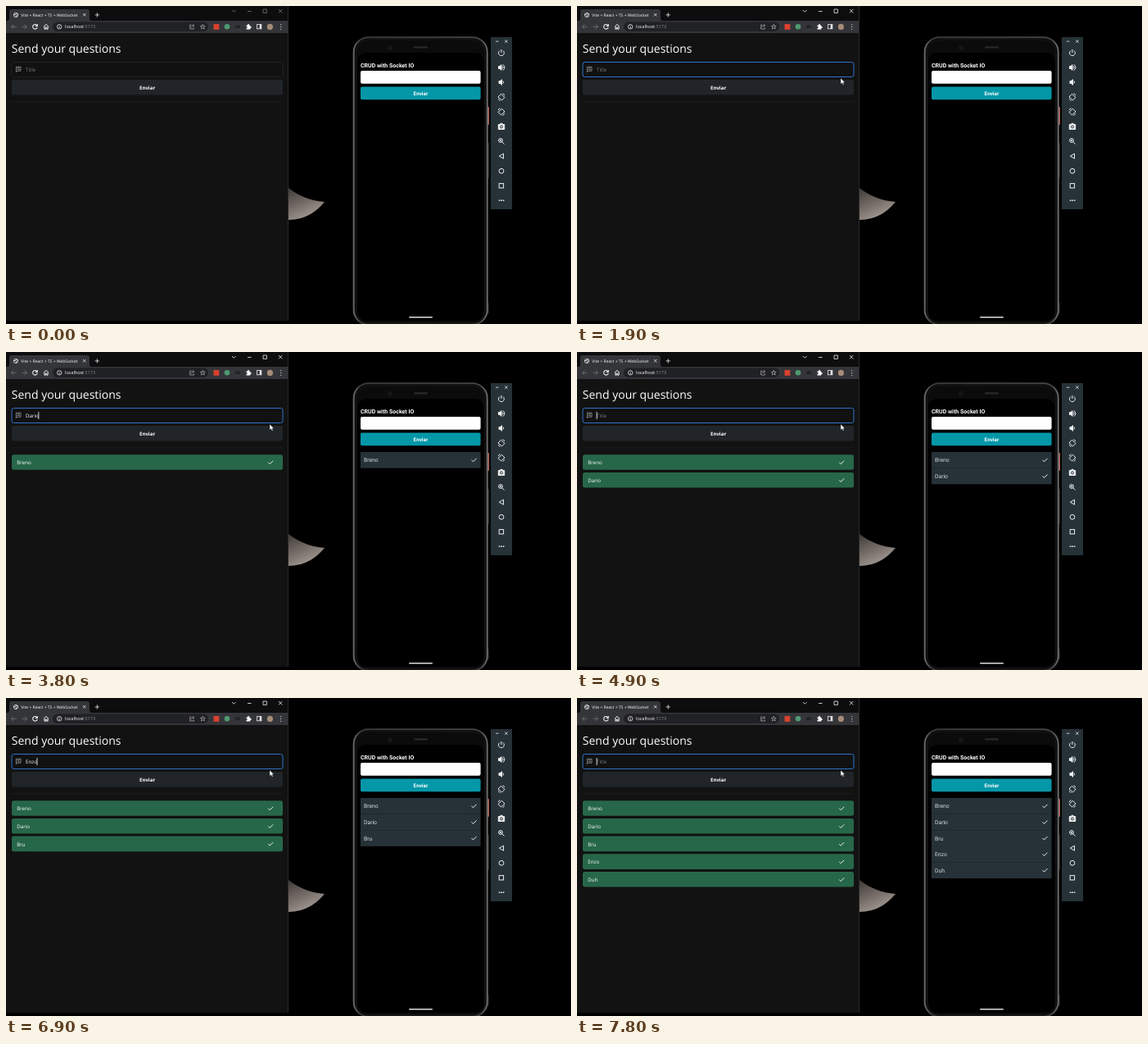
Animation, 690 px wide and 388 px high, one loop 8000 ms. Source, as an HTML page:

```html
<!DOCTYPE html>
<html lang="en">
<head>
<meta charset="utf-8">
<title>Send your questions</title>
<style>
  html, body { margin: 0; width: 100%; height: 100%; overflow: hidden; background: #000; }
  svg { display: block; width: 690px; height: 388px; }
  text { fill: #fff; font-family: "Open Sans", sans-serif; text-rendering: geometricPrecision; white-space: pre; }
  .app text { font-family: Roboto, sans-serif; }
  .line { fill: none; stroke: #eee; stroke-width: 1; }
  .bold { font-weight: 700; }
</style>
</head>
<body>
<svg viewBox="0 0 690 388">
  <defs>
    <linearGradient id="moon" x1="0" y1="0" x2=".5" y2="1">
      <stop offset="0" stop-color="#3e3936"/>
      <stop offset=".55" stop-color="#766d68"/>
      <stop offset="1" stop-color="#a39a94"/>
    </linearGradient>
    <linearGradient id="metal">
      <stop offset="0" stop-color="#666"/>
      <stop offset=".05" stop-color="#3a3a3a"/>
      <stop offset=".95" stop-color="#444"/>
      <stop offset="1" stop-color="#6a6a6a"/>
    </linearGradient>
  </defs>

  <rect width="690" height="388"/>
  <path d="M345 222Q364 237 389 239Q371 261 345 261Z" fill="url(#moon)"/>

  <!-- Browser -->
  <rect width="345" height="384" fill="#121212"/>
  <rect width="345" height="18" fill="#0d0d0e"/>
  <path d="M0 18H2Q4 18 4 15V7Q4 4 7 4H99Q102 4 102 7V15Q102 18 105 18H345V33H0Z" fill="#343539"/>
  <rect x="57" y="19.5" width="190" height="11.5" rx="5.7" fill="#202124"/>
  <path d="M344.5 0V384" class="line" style="stroke:#2a2a2a"/>
  <g class="line" style="stroke-width:.8">
    <circle cx="12" cy="11" r="2.6"/>
    <path d="M9.6 10.5H12L13 12L12 13.4M12 8.5L13 9.8H14.5"/>
    <path d="M94 9L97.4 12.4M97.4 9L94 12.4M108.7 10.9H113.9M111.3 8.3V13.5"/>
    <path d="M12.5 25.3H6.5M9.3 22.5L6.5 25.3L9.3 28.1M19.5 25.3H25.5M22.7 22.5L25.5 25.3L22.7 28.1" stroke="#77787b"/>
    <path d="M37.6 23.5A2.8 2.8 0 1 0 38.2 26M38.3 22V24.4H35.9" stroke-width="1.1"/>
    <path d="M46 25.3L49 22.4L52 25.3M46.9 25V28.2H48.3V26.2H49.7V28.2H51.1V25" stroke-width="1"/>
    <circle cx="65.2" cy="25.3" r="2.7"/>
    <path d="M65.2 25V27M65.2 23.6V24.2"/>
    <path d="M226.5 23H224.7V28H229.5V26.5M226 26Q226.5 24 229 23.8M228 22.2L229.8 23.8L228 25.4" stroke="#bbb" stroke-width=".7"/>
    <path d="M240.3 22.3L241.1 24.4H243.2L241.5 25.8L242.2 28L240.3 26.7L238.4 28L239.1 25.8L237.4 24.4H239.5Z" stroke="#ccc" stroke-width=".6"/>
    <rect x="306.5" y="22.6" width="5.4" height="5.2"/>
    <path d="M310.7 22.6V27.8" stroke-width="2"/>
  </g>
  <rect x="253.5" y="22" width="6.8" height="6.8" fill="#d8412f"/>
  <circle cx="270" cy="25.3" r="3.3" fill="#4f9a72"/>
  <rect x="280" y="23.5" width="6" height="3.5" fill="#222326"/>
  <path d="M293.5 23.5H295Q295 21.8 296 21.8T297 23.5H298.3V25Q299.8 25 299.8 26T298.3 27V28.5H293.5V27Q294.8 26.8 294.8 26T293.5 25Z" fill="#fff"/>
  <circle cx="322.4" cy="25.4" r="3.6" fill="#a58c77"/>
  <path d="M335.7 22.2V29" class="line" stroke-dasharray="1 1.8"/>
  <text x="18.3" y="12.8" font-size="5">Vite + React + TS + WebSocket</text>
  <text x="72" y="27.3" font-size="5.5">localhost<tspan fill="#8d9094">:5173</tspan></text>
  <path id="controls" class="line" d="M276 5L278.3 7.3L280.6 5M295 6.5H299.6M314 4H318.4V8.4H314ZM333 4L337.4 8.4M337.4 4L333 8.4" style="stroke-width:.8"/>

  <text x="6.8" y="56.5" font-size="14">Send your questions</text>
  <rect id="field" x="7" y="68.5" width="331" height="18" rx="2.5" fill="#111"/>
  <path class="line" d="M12.4 74.3H18V79.2H13.8L12.4 80.7ZM13.6 75.8H16.8M13.6 77.4H16.8" style="stroke:#aaa;stroke-width:.7"/>
  <text id="entry" x="24" y="80" font-size="6.2"></text>
  <rect id="caret" y="73" width=".8" height="9" fill="#fff"/>
  <rect x="7" y="90" width="331" height="18.5" rx="2.5" fill="#212529"/>
  <text x="172.6" y="101.8" font-size="6.1" text-anchor="middle" class="bold">Enviar</text>
  <path d="M7 116.8H338" class="line" style="stroke:#1d1d1d"/>

  <!-- Phone -->
  <rect x="587" y="123" width="3" height="22" rx="1" fill="#bc625b"/>
  <rect x="587" y="167" width="3" height="43" rx="1" fill="#292929"/>
  <rect x="587" y="362" width="2.5" height="13" rx="1" fill="#333"/>
  <rect x="424.7" y="38.2" width="163" height="350.5" rx="18" fill="#070707" stroke="url(#metal)" stroke-width="2"/>
  <rect x="427.5" y="41" width="157.5" height="346" rx="15" fill="#0b0b0b" stroke="#222" stroke-width=".7"/>
  <rect x="429" y="57" width="154.5" height="327" rx="11"/>
  <circle cx="469" cy="51" r="3.2" fill="#151515"/>
  <rect x="498" y="49.2" width="17" height="2.4" rx="1.2" fill="#292929"/>
  <rect x="492" y="379" width="29" height="1.6" rx=".8" fill="#ddd"/>
  <g class="app">
    <text x="433" y="74.8" font-size="7" class="bold">CRUD with Socket IO</text>
    <rect x="433" y="79" width="146.6" height="15.7" rx="2" fill="#fff"/>
    <rect x="433" y="98.4" width="146.6" height="15.8" rx="2" fill="#0497a8"/>
    <text x="506.4" y="108.9" font-size="6.3" text-anchor="middle" class="bold">Enviar</text>
  </g>
  <g id="rows"></g>

  <!-- Emulator tools -->
  <rect x="592" y="38" width="26" height="210" fill="#263238"/>
  <g class="line" id="tools">
    <path d="M598 43.2H601.5M609.2 41.5L612.5 44.8M612.5 41.5L609.2 44.8" stroke-width=".8"/>
    <path d="M602.9 54.5A3.4 3.4 0 1 0 606.9 54.5M604.9 53V57"/>
    <path d="M601.5 73.5H603L605 71.7V78.3L603 76.5H601.5Z" fill="#eee"/>
    <path d="M606.3 73.4Q608 75 606.3 76.6M606.8 71.3Q611 75 606.8 78.7"/>
    <path d="M602 91.5H603.5L605.5 89.7V96.3L603.5 94.5H602Z" fill="#eee"/>
    <path d="M606.8 91.4Q608.5 93 606.8 94.6"/>
    <path d="M601 111L604.5 107.3L609 111.5L605.5 115ZM601.3 113.3Q602 115 603.5 115.5M606.5 106.8Q608.3 107.2 608.8 109"/>
    <path d="M609 129L605.5 125.3L601 129.5L604.5 133ZM608.7 131.3Q608 133 606.5 133.5M603.5 124.8Q601.7 125.2 601.2 127"/>
    <path d="M601.3 144.5H603L604 143.3H606L607 144.5H608.7V150.5H601.3Z" fill="#eee"/>
    <circle cx="605" cy="147.4" r="1.5" fill="#eee" stroke="#263238"/>
    <circle cx="604" cy="164" r="2.4"/>
    <path d="M605.7 165.7L608.5 168.5M602.8 164H605.2M604 162.8V165.2"/>
    <path d="M607.5 180.2V186.2L602.3 183.2Z"/>
    <circle cx="605" cy="201.3" r="2.9"/>
    <rect x="602.2" y="216.6" width="5.4" height="5.4"/>
    <path d="M601.8 237.2H608.5" stroke-width="1.6" stroke-dasharray="1.6 .9"/>
  </g>

  <path id="pointer" d="M0 0V7.2L1.7 5.7L2.9 8.2L4.1 7.7L3 5.2H5.2Z" fill="#fff" stroke="#111" stroke-width=".4"/>
</svg>

<script>
const LOOP = 8000, FOCUS = 1400;
const $ = id => document.getElementById(id);

// Each entry: name, [time, letters shown] for the keystrokes, submit time
const entries = [
  ["Breno", [[2500, 1], [2600, 2], [2700, 3], [2800, 4], [2900, 5]], 3100],
  ["Dario", [[3400, 1], [3600, 2], [3800, 5]], 4000],
  ["Bru", [[5600, 1], [5700, 2], [5900, 3]], 6000],
  ["Enzo", [[6400, 1], [6600, 2], [6700, 3], [6900, 4]], 7000],
  ["Duh", [[7200, 1], [7400, 2], [7500, 3]], 7800]
];
const caretOff = [[1900, 2500], [4400, 4900], [5400, 5600]];
const path = [[300, 338, 192], [500, 288, 156], [700, 231, 123.5], [900, 206, 105],
  [1100, 205, 92], [1400, 235, 79], [1700, 322, 88]];

const check = (x, y) => `<path class="line" d="M${x - 3} ${y}L${x - 1} ${y + 2}L${x + 3} ${y - 2}"/>`;

$("rows").innerHTML = entries.map(([name], i) => {
  const y = 125.2 + 21.7 * i, py = 122 + 19.6 * i;
  return `<g>
    <rect x="7" y="${y}" width="331" height="18.6" rx="2.5" fill="#276749"/>
    <text x="13.3" y="${y + 12}" font-size="6.2">${name}</text>${check(323.2, y + 9.5)}
    <g class="app"><rect x="433" y="${py}" width="146.6" height="19.7" fill="#263238"/>
    <text x="437" y="${py + 12.4}" font-size="6.8" style="fill:#d5d8da">${name}</text>${check(571.5, py + 9.8)}</g>
  </g>`;
}).join("");

function pointerAt(t) {
  const i = path.findIndex(p => p[0] > t);
  if (i < 0) return path.at(-1).slice(1);
  const [a, b] = [path[i - 1], path[i]], k = (t - a[0]) / (b[0] - a[0]);
  return [a[1] + (b[1] - a[1]) * k, a[2] + (b[2] - a[2]) * k];
}

function draw(now) {
  const t = Math.floor(now % LOOP / 100) * 100;
  const focused = t >= FOCUS;
  const current = entries.find(e => t < e[2]);
  const key = current && current[1].findLast(k => t >= k[0]);
  const typed = key ? current[0].slice(0, key[1]) : "";

  $("entry").textContent = typed || "Title";
  $("entry").style.fill = typed ? "#fff" : "#777b80";
  $("caret").setAttribute("x", 23.7 + (typed ? $("entry").getComputedTextLength() : 0));
  $("caret").style.opacity = +(focused && !caretOff.some(([a, b]) => t >= a && t < b));
  $("field").setAttribute("stroke", focused ? "#2f73c8" : "#222");
  $("controls").style.stroke = focused ? "#eee" : "#77787b";
  entries.forEach((e, i) => $("rows").children[i].style.display = t >= e[2] ? "" : "none");

  $("pointer").style.display = t < path[0][0] ? "none" : "";
  if (t >= path[0][0]) $("pointer").setAttribute("transform", `translate(${pointerAt(t)})`);
  requestAnimationFrame(() => draw(performance.now() - start));
}
const start = performance.now();
draw(0);
</script>
</body>
</html>
```
